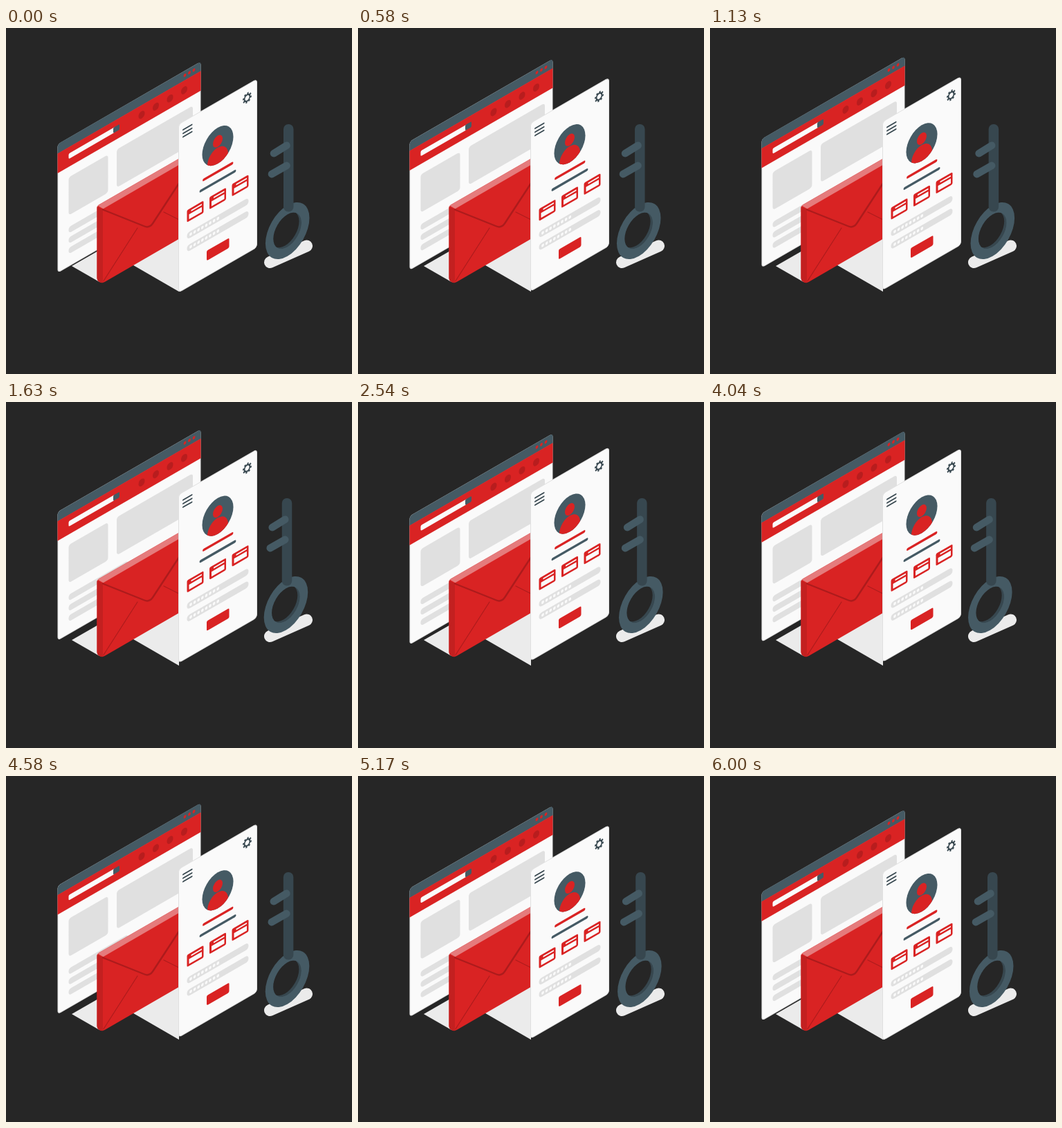
Animation, 500 px wide and 500 px high, one loop 6040 ms. Source, as an HTML page:

```html
<!DOCTYPE html>
<html lang="en">
<head>
<meta charset="utf-8">
<title>Secure login</title>
<style>
  html, body { margin: 0; width: 100%; height: 100%; overflow: hidden; background: #262626; }
  svg { display: block; width: 100%; height: 100%; }
  .bg { fill: #262626; }
  .red { fill: #d92323; }
  .deep { fill: #b81d1e; }
  .slate { fill: #455a64; }
  .dark { fill: #37474f; }
  .paper { fill: #fafafa; }
  .floor { fill: #ebebeb; }
  .grey { fill: #e0e0e0; }
  .sheet { fill: #fafafa; stroke: #e0e0e0; stroke-width: 1; }
  .line { fill: none; stroke-linecap: round; stroke-linejoin: round; }
  .fold { stroke: #ad1b1c; }
</style>
</head>
<body>
<svg viewBox="0 0 500 500">
  <defs>
    <clipPath id="face"><circle r="26"/></clipPath>
    <clipPath id="hole"><circle r="23.5"/></clipPath>
  </defs>
  <rect class="bg" width="500" height="500"/>

  <path class="floor" d="M95 344 135 321V367Z"/>
  <path class="floor" d="M183 342.3 250 304V381Z"/>

  <g id="browser">
    <g id="browserFace" transform="translate(74.5 168) skewY(-30)">
      <rect class="sheet" x=".5" y=".5" width="206" height="185" rx="4"/>
      <path class="slate" d="M0 14V5Q0 0 5 0H203Q207 0 207 4V14Z"/>
      <rect class="red" y="13.5" width="207" height="28.5"/>
      <rect class="paper" x="16" y="22.8" width="67" height="7.8" rx="2"/>
      <rect class="slate" x="80.5" y="22.6" width="9" height="8" rx="1.5"/>
      <rect class="grey" x="16" y="57" width="57" height="55" rx="4"/>
      <rect class="grey" x="85.5" y="57" width="110" height="55" rx="4"/>
    </g>
  </g>

  <g id="envelope">
    <path class="red" d="M131.5 260Q131.5 257 134.5 255.3L260 183V299L143 366.8Q139 369 136 367.5 131.5 365.500 131.500 361Z"/>
    <path fill="#c32020" d="M131.500 258 140 262V367.900Q138 368.500 136 367.500 131.500 365.500 131.500 361Z"/>
    <path fill="#e57b7c" d="M132.500 256.800 134.500 255.300 260 183V192L140.500 261.300Z"/>
    <path class="line fold" stroke-width="1.200" d="M190 289 141 365.500M228 266 260 282"/>
    <path class="line fold" stroke-width="2.400" d="M140 262.500 200 286.500Q207 289.500 212 282.500L262 206"/>
  </g>

  <g id="card">
    <g id="cardFace" transform="translate(249 139) skewY(-30)">
      <rect class="sheet" x=".5" y=".5" width="113" height="243" rx="4.500"/>
      <path class="line" stroke="#37474f" stroke-width="2" d="M7 12H19.500M7 17.200H19.500M7 22.300H19.500"/>
      <g class="line" transform="translate(99.500 19.400) scale(.866 1)" stroke="#37474f">
        <circle r="4.600" stroke-width="2.200"/>
        <circle r="6.300" stroke-width="2.400" stroke-linecap="butt" pathLength="16" stroke-dasharray="1"/>
      </g>
      <g transform="translate(57 64) scale(.866 1)">
        <circle class="slate" r="26"/>
        <g class="red" clip-path="url(#face)">
          <circle cy="-6.500" r="8.100"/>
          <circle cy="20" r="17.300"/>
        </g>
      </g>
      <path class="line" stroke="#d92323" stroke-width="3.800" d="M37 101.500H77.500"/>
      <path class="line" stroke="#455a64" stroke-width="3.800" d="M32.500 115.200H81.500"/>
      <rect class="red" x="41" y="206.700" width="32.500" height="14.300" rx="2"/>
    </g>
  </g>

  <path class="line" stroke="#ebebeb" stroke-width="17" d="M381.500 338.500 434.500 315"/>
  <g id="key">
    <g transform="translate(406.700 293) skewY(-30) scale(.866 1)">
      <circle class="slate" r="36.700"/>
      <g clip-path="url(#hole)">
        <circle class="dark" r="23.500"/>
        <circle class="bg" cx="-4" cy="-4" r="23.500"/>
      </g>
    </g>
    <rect class="dark" x="401" y="139" width="14.500" height="126.500" rx="7"/>
    <path class="line" stroke="#455a64" stroke-width="10.600" d="M387 181.200 405.500 169.700M384 211.200 405.500 198.800"/>
  </g>
</svg>
<script>
  const $ = id => document.getElementById(id);

  function add(parent, tag, cls, attrs) {
    const el = document.createElementNS("http://www.w3.org/2000/svg", tag);
    el.setAttribute("class", cls);
    for (const name in attrs) el.setAttribute(name, attrs[name]);
    parent.append(el);
  }
  const box = (parent, cls, x, y, width, height, rx) =>
    add(parent, "rect", cls, { x, y, width, height, rx });
  // A circle lying in the isometric face
  const dot = (parent, cls, cx, cy, r) =>
    add(parent, "ellipse", cls, { cx, cy, rx: r * 0.866, ry: r });

  const page = $("browserFace");
  for (let i = 0; i < 3; i++) {
    dot(page, "red", 184 + i * 6.5, 6.5, 2.2);
    box(page, "grey", 16, 129 + i * 15, 86, 9, 4);
  }
  for (let i = 0; i < 4; i++) dot(page, "deep", 121.5 + i * 20.5, 27.6, 5.2);

  const form = $("cardFace");
  for (const x of [12.5, 45, 77.5]) {
    box(form, "red", x, 131.5, 24, 17.7, 2);
    box(form, "paper", x + 6, 134.6, 15.500, 2, 0.5);
    box(form, "paper", x + 3, 139.3, 18.5, 7, 0.5);
  }
  for (const y of [169.3, 187.5]) {
    box(form, "grey", 12.5, y - 4.8, 89, 9.6, 4.5);
    for (let i = 0; i < 8; i++) dot(form, "paper", 18 + i * 5.6, y, 2.2);
  }

  const LOOP = 6040, FPS = 24;
  // Sideways shake, one offset for every tenth of six seconds
  const SHAKE = [0, -1, 2, -4, 4, -4, 4, -4, 2, -1, 0];

  const float = (s, period) => -10 * (1 - Math.abs(1 - 2 * (s / period % 1)));

  function shake(s) {
    const pos = s / 0.6;
    const i = Math.min(9, Math.floor(pos));
    return SHAKE[i] + (SHAKE[i + 1] - SHAKE[i]) * (pos - i);
  }

  const move = (id, x, y) => $(id).setAttribute("transform", `translate(${x} ${y})`);

  function draw(ms) {
    const s = Math.floor((ms + 5) * FPS / 1000) / FPS;
    move("browser", 0, float(s, 3));
    move("card", 0, float(s, 6));
    move("key", shake(s), 0);
  }

  const start = performance.now();
  function tick() {
    draw((performance.now() - start) % LOOP);
    requestAnimationFrame(tick);
  }
  tick();
</script>
</body>
</html>
```
